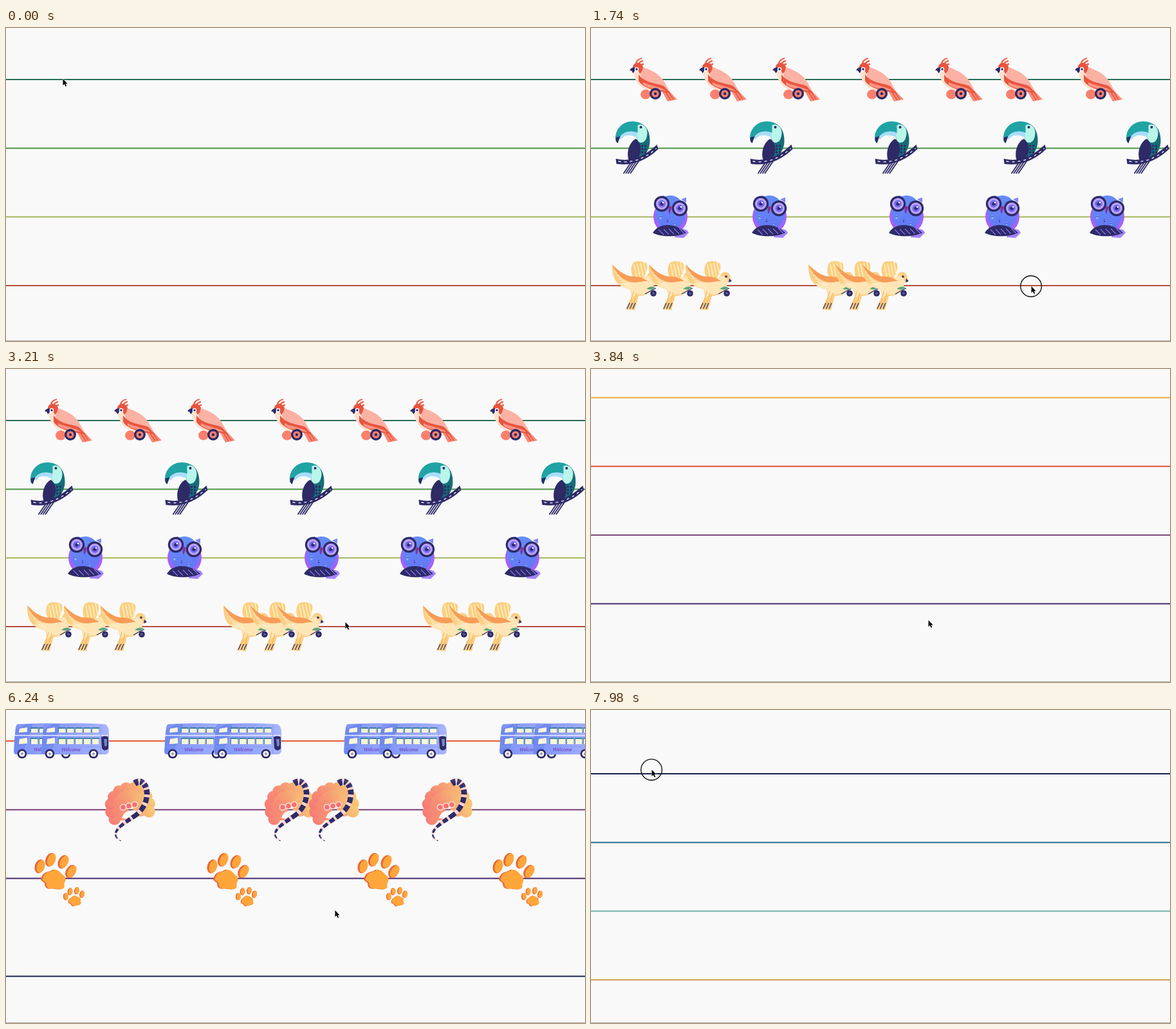
Animation of 900 by 486 pixels, one loop 8 s. Source, as an HTML page with a canvas:

```html
<!DOCTYPE html>
<html lang="en">
<head>
<meta charset="utf-8">
<title>Line garden</title>
<style>
html, body { margin: 0; width: 100%; height: 100%; overflow: hidden; background: #f9f9f9; }
canvas { display: block; width: 900px; height: 486px; }
</style>
</head>
<body>
<canvas id="stage"></canvas>
<script>
const LOOP = 8000, W = 900, H = 486, NAVY = '#2d2a66', CREAM = '#fde5b5';
const canvas = document.getElementById('stage');
const dpr = window.devicePixelRatio || 1;
canvas.width = W * dpr;
canvas.height = H * dpr;
const g = canvas.getContext('2d');

// drawing helpers
const paths = new Map();
function path(d) {
  if (!paths.has(d)) paths.set(d, new Path2D(d));
  return paths.get(d);
}
function fill(color, d) { g.fillStyle = color; g.fill(path(d)); }
function line(color, width, d) {
  g.strokeStyle = color;
  g.lineWidth = width;
  g.stroke(path(d));
}
function oval(color, x, y, rx, ry = rx, turn = 0) {
  g.fillStyle = color;
  g.beginPath();
  g.ellipse(x, y, rx, ry, turn, 0, 7);
  g.fill();
}
// concentric discs
function rings(x, y, r, step, ...shades) {
  shades.forEach((c, i) => oval(c, x, y, r - i * step));
}
// n parallel strokes, each shifted by (dx, dy)
function hatch(color, width, n, x, y, dx, dy, lx, ly) {
  g.strokeStyle = color;
  g.lineWidth = width;
  g.beginPath();
  for (let i = 0; i < n; i++) {
    g.moveTo(x + i * dx, y + i * dy);
    g.lineTo(x + i * dx + lx, y + i * dy + ly);
  }
  g.stroke();
}
function fade(x0, y0, x1, y1, a, b) {
  const c = g.createLinearGradient(x0, y0, x1, y1);
  c.addColorStop(0, a);
  c.addColorStop(1, b);
  return c;
}
function text(str, x, y, font, color) {
  g.font = font;
  g.fillStyle = color;
  g.fillText(str, x, y);
}
const mix = (a, b, u) => a + (b - a) * u;
const ease = u => u <= 0 ? 0 : u >= 1 ? 1 : u * u * (3 - 2 * u);

function paw() {
  const pad = 'M4 43C6 28 16 32 22 27C30 26 32 33 38 37C43 43 36 47 38 53C36 60 27 57 21 56C14 59 9 53 10 48Z';
  for (const [color, dx, thin] of [['#e8663a', -.5, 0], ['#ffa63a', 1.2, 1.5]]) {
    for (let i = 0; i < 4; i++) {
      const a = 3.75 + i * .76;
      oval(color, 24 + 27 * Math.cos(a) + dx, 36 + 25 * Math.sin(a), 7.5 - thin, 11 - thin / 2, .3 + i * .08);
    }
    g.save();
    g.translate(dx * 1.5, 0);
    fill(color, pad);
    g.restore();
  }
}

// each sprite: [half width, y of the line inside it, draw]
const sprites = {
  cardinal: [37, 34, () => {
    line('#f0604a', 2.3, 'M10 9Q11 3 19 1M14 10Q16 6 21 5M17 13Q18 10 22 10');
    fill('#fa8a78', 'M54 44L74 65L59 68L49 50Z');
    hatch('#e8553f', 1.5, 2, 53, 49, 4, -1, 11, 17);
    fill('#fde0cf', 'M6 23C8 38 18 51 40 54L58 52L20 18Z');
    fill('#fbb1a3', 'M18 14C31 18 46 24 54 38L62 52C40 50 24 44 17 27Z');
    fill('#e8553f', 'M14 26C24 40 40 39 53 44L64 56C46 51 24 51 14 36Z');
    fill('#fa9483', 'M21 38C30 43 42 44 53 49L57 52C42 49 28 48 21 42Z');
    fill('#e8553f', 'M5 15C6 6 17 6 21 14Q20 22 16 25Q12 16 5 15Z');
    fill(NAVY, 'M0 20Q2 15 8 15Q9 22 5 24Q3 19 0 20Z');
    rings(11, 18, 3.2, 1.4, '#fff', NAVY);
    oval('#fa806e', 25, 57, 8, 7.5);
    rings(40, 56, 9, 3.4, NAVY, '#fa806e', NAVY);
  }],
  toucan: [33.5, 42, () => {
    hatch(NAVY, 1.8, 4, 26, 62, 3.5, 0, -13, 19);
    fill('#176c78', 'M30 2C46 0 55 15 54 32C53 47 44 58 30 60C22 48 26 34 34 28Z');
    fill('#20a3a4', 'M1 31C-2 13 11 0 27 0Q39 0 42 6L36 19C24 12 9 16 4 33Z');
    fill('#a7ddfa', 'M6 26C13 14 27 14 36 18L34 25C24 20 15 20 9 28Z');
    fill(NAVY, 'M1 25L8 23L4 34Q1 32 1 25Z');
    fill('#b9f6e9', 'M35 6C43 2 49 8 50 17C50 28 45 34 39 33C33 31 33 24 35 18Z');
    oval(NAVY, 40, 9, 2);
    fill(NAVY, 'M32 27C42 34 42 50 34 58L22 62C17 52 20 34 32 27Z');
    for (let i = 0; i < 6; i++) oval(NAVY, 42 + i % 2 * 5, 38 + (i >> 1) * 5, 1.7);
    fill(NAVY, 'M1 58Q34 66 65 36L67 43Q38 71 2 66Z');
    g.setLineDash([4, 5]);
    line('#f4f4ff', 1.3, 'M5 62Q36 67 64 42');
    g.setLineDash([]);
  }],
  owl: [28, 34, () => {
    fill('#7f86f4', 'M12 5L16 1L24 4ZM44 7L52 4L52 12Z');
    oval('#a263f8', 27.5, 34, 26.5, 27);
    oval(fade(20, 5, 30, 62, '#668cfa', '#6273f2'), 27.5, 28, 23, 27);
    for (let i = 0; i < 9; i++) oval(i % 2 ? '#4436a0' : '#82b4ff', 12 + i * 11 % 33, 34 + i * 5 % 14, i % 3 ? 1.2 : 2);
    for (const [x, y] of [[14, 14], [42, 21]]) {
      rings(x, y, 12.2, 3.2, NAVY, '#bba4ff', '#7469ee', NAVY);
      oval('#fff', x + 2, y - 2, 1.3);
    }
    fill('#8a2f94', 'M26 17L30 19L26 30Q23 24 26 17Z');
    fill('#a284ff', 'M36 54Q52 50 56 59L48 67L34 66Z');
    fill(NAVY, 'M0 59C10 42 36 44 52 59C38 66 12 66 0 59Z');
    hatch('#8b72f4', 1.1, 5, 9, 54, 8, -.5, 8, 8);
  }],
  dove: [36, 38, () => {
    fill('#fbd07f', 'M32 25C27 14 30 3 35 1Q44 -2 53 3C57 10 52 21 46 30Z');
    hatch('#fff0cd', 1.4, 4, 34, 5, 5, -1, 4, 20);
    fill('#fbcf83', 'M0 5C-1 30 10 41 28 43L30 55L21 75L35 76L41 54C55 54 64 46 65 34L70 29C72 16 56 12 54 24C36 32 14 20 0 5Z');
    fill(CREAM, 'M10 35C24 34 48 28 57 23Q67 25 65 36C61 49 48 54 40 51L30 58L29 44Q18 43 10 35Z');
    hatch('#fff0cf', 1.2, 4, 4, 16, 3, 5, 20, 12);
    fill('#f79c58', 'M0 5C12 19 26 25 37 24Q47 25 55 31C44 31 32 36 22 30Q8 24 0 5Z');
    hatch('#f6b85d', 1.1, 2, 33, 47, 5, 2, -6, 22);
    hatch(NAVY, 1.2, 3, 23, 74, 4.5, 0, 4, -9);
    fill(NAVY, 'M68 27L72 31L67 33Z');
    oval(NAVY, 63, 24, 1.8);
    fill('#5aa57d', 'M53 43Q60 37 67 41Q62 46 53 43Z');
    line(NAVY, 1.2, 'M51 51L60 46L68 42');
    rings(64, 50, 4.8, 3, NAVY, '#675fa2');
  }],
  sign: [37.5, 39, () => {
    fill('#f7b9b7', 'M27 27C24 12 36 -1 48 0C58 4 56 20 45 30Z');
    fill('#f1655d', 'M12 39C5 25 7 12 14 10C28 15 31 27 26 36ZM47 38C48 24 57 18 64 22C64 31 59 40 50 43Z');
    fill('#f3746c', 'M12 73C-2 66 -3 47 6 41C17 42 22 60 18 73ZM18 65C17 51 24 44 31 47C36 53 30 65 24 71Z');
    line('#fff', 1.4, 'M7 45L15 70M27 50L21 66');
    hatch('#fff', 1.4, 3, 2, 51, 2, 7, 8, 2);
    hatch('#fff', 1.4, 3, 12, 47, 1, 7, -3, 6);
    for (let i = 0; i < 4; i++) {
      g.strokeStyle = NAVY;
      g.lineWidth = 1.4;
      g.beginPath();
      g.arc(20 + i * 9, 24, 3.5, 2.5, 7.5);
      g.stroke();
    }
    fill('#f27069', 'M15 28L53 30V45L15 43Z');
    line(NAVY, 2, 'M15 17V45M15 28L55 30M15 43L54 45M53 28V46');
    text('Welcome', 20, 39, 'italic 8px "Noto Serif", serif', '#fff');
    line('#f27069', 2, 'M42 57L54 45L65 57');
    fill(NAVY, 'M11 65Q12 59 19 62Q25 58 28 64Q28 73 19 75Q12 73 11 65Z');
    fill('#f26a65', 'M29 56H74Q76 66 74 79H30Q28 68 29 56Z');
    fill('#c43c4c', 'M30 72Q38 65 47 79H30Z');
    text('OPEN', 34, 72, 'bold 13px Lato, sans-serif', NAVY);
    rings(72, 57, 3.5, 2, '#e84945', NAVY);
  }],
  bus: [53, 27, () => {
    fill(fade(0, 0, 106, 0, '#7d92f6', '#aab5ff'), 'M6 1Q55 -2 99 1Q104 3 105 12V41Q105 47 100 48H4Q0 48 0 42L3 6Q4 2 6 1Z');
    fill('#7089ee', 'M3 10L18 1H29L24 18L14 47H1V25Z');
    hatch('#e9ecff', 1.6, 1, 2, 18.5, 0, 0, 102, 0);
    for (const [y, h] of [[6, 8], [22, 10]]) {
      for (let x = 26; x < 90; x += 13) {
        g.fillStyle = '#3a7fa8';
        g.fillRect(x, y, 12, h);
        g.fillStyle = '#f8f6d8';
        g.fillRect(x + 1, y + 2, 10.5, h - 2);
      }
      fill('#f8f6d8', `M9 ${y + 2}L21 ${y}V${y + h - 1}L8 ${y + h}Z`);
    }
    line('#8799f5', 1, 'M2 36H92M92 2V47');
    fill(NAVY, 'M93 21Q99 18 104 21V39Q98 45 94 38Z');
    fill('#7681c9', 'M97 24H102V34Q99 37 98 34Z');
    text('Welcome', 31, 43, 'italic 7px "Noto Serif", serif', '#6c2fb5');
    for (const x of [13, 81]) rings(x, 47, 7.3, 2.7, NAVY, '#fbf8f0', '#8d92bb');
  }],
  coral: [39.5, 49, () => {
    for (const [reach, r] of [[30, 9.5], [16, 11]]) {
      for (let a = 2.5; a < 6.7; a += .4) {
        const x = 39 + reach * Math.cos(a), y = 45 + reach * Math.sin(a);
        const warm = Math.round(mix(105, 185, x / 79));
        oval(fade(x - r, y + r, x + r, y - r, `rgb(246,${warm},115)`, `rgb(247,${warm + 35},118)`), x, y, r);
      }
    }
    fill('#f9f9f9', 'M26 62Q30 48 48 50L54 54L42 64Z');
    for (let i = 0; i < 3; i++) rings(28 + i * 9, 45 - i * 2, 5.3, 1.5, '#fde1d8', '#f5716e');
    tail();
  }],
  paws: [36.5, 41, () => {
    paw();
    g.translate(57, 69);
    g.rotate(-.3);
    g.scale(.52, .52);
    g.translate(-29, -31);
    paw();
  }]
};

// striped tail that thins toward its tip
function tail() {
  const bez = (a, b, c, d, u) => mix(mix(mix(a, b, u), mix(b, c, u), u), mix(mix(b, c, u), mix(c, d, u), u), u);
  const at = u => u < .6
    ? [bez(46, 66, 78, 42, u / .6), bez(8, -7, 41, 61, u / .6)]
    : [bez(42, 30, 3, 24, u / .4 - 1.5), bez(61, 70, 85, 97, u / .4 - 1.5)];
  for (let i = 0; i < 100; i++) {
    const [x, y] = at(i / 100), [x2, y2] = at((i + 1.4) / 100);
    g.strokeStyle = i % 9 < 6 ? NAVY : '#fbd0cb';
    g.lineWidth = i < 60 ? 10 - i / 20 : mix(7, 1, (i - 60) / 40);
    g.beginPath();
    g.moveTo(x, y);
    g.lineTo(x2, y2);
    g.stroke();
  }
}

// page: three groups of four lines
const colors = ['#2a6e58', '#4f9448', '#a5b85c', '#b5503f', '#f6ae38', '#e4552f',
  '#7a4378', '#49296b', '#1a2350', '#28708f', '#74b3ac', '#d3a14d'];
const lineY = colors.map((c, i) => 80 + (i >> 2) * 472 + i % 4 * 320 / 3);

// scroll moves: start, duration, distance
const moves = [[3240, 210, 403.5], [3690, 150, 104], [4100, 300, -21],
  [5790, 140, 124], [6570, 300, 304.5], [7020, 60, 10]];
const scrollAt = t => moves.reduce((sum, [from, span, by]) => sum + by * ease((t - from) / span), 0);

// resting points of the pointer; planting adds the rest
const stops = [[0, 88, 79], [1740, 684, 401], [2600, 640, 453], [3210, 527, 393], [3840, 524, 390],
  [4020, 524, 390], [4830, 101, 66], [5220, 283, 69], [6240, 511, 311], [7260, 511, 311], [7980, 94, 92.7]];
const items = [], clicks = [LOOP];

function plant(kind, row, start, gap, xs) {
  xs.forEach((x, i) => {
    const t = start + i * gap;
    items.push({ kind, row, x, t });
    clicks.push(t);
    stops.push([t, x, lineY[row] - scrollAt(t)]);
  });
}
plant('cardinal', 0, 75, 47, [97, 205, 319, 449, 572, 665, 789]);
plant('toucan', 1, 430, 67, [865, 674, 474, 280, 71]);
plant('owl', 2, 770, 72, [124, 278, 491, 640, 803]);
[[69, 57], [374, 42], [684, 41]].forEach(([x, d], i) => plant('dove', 3, 1200 + i * 290, 85, [x, x + d, x + 2 * d]));
plant('sign', 4, 4990, 0, [101]);
plant('sign', 4, 5290, 53, [290, 480, 670, 850]);
[[65, 43], [299, 77], [578, 55], [820, 52]].forEach(([x, d], i) => plant('bus', 5, 5510 + i * 66, 33, [x, x + d]));
plant('coral', 6, 5940, 30, [193.5, 441.5, 510.5, 686.5]);
plant('paws', 7, 6080, 30, [87.5, 355.5, 589.5, 799.5]);
stops.sort((a, b) => a[0] - b[0]);

function pointerAt(t) {
  const i = stops.findIndex(s => s[0] > t);
  if (i < 0) return stops[stops.length - 1].slice(1);
  const [t0, x0, y0] = stops[i - 1], [t1, x1, y1] = stops[i];
  const u = ease((t - t0) / (t1 - t0));
  return [mix(x0, x1, u), mix(y0, y1, u)];
}

function drawPointer(t) {
  g.save();
  g.translate(...pointerAt(t));
  if (clicks.some(c => Math.abs(t - c) < 55)) {
    g.strokeStyle = '#111';
    g.lineWidth = 1.4;
    g.beginPath();
    g.arc(0, 0, 16.3, 0, 7);
    g.stroke();
  }
  const arrow = 'M0.5 0V10.2L2.8 8L4.5 11.8L6.2 11L4.5 7.4H7.5Z';
  line('#fff', 1, arrow);
  fill('#000', arrow);
  g.restore();
}

function draw(t) {
  const scroll = scrollAt(t);
  g.setTransform(dpr, 0, 0, dpr, 0, 0);
  g.fillStyle = '#f9f9f9';
  g.fillRect(0, 0, W, H);
  lineY.forEach((y, i) => {
    g.fillStyle = colors[i];
    g.fillRect(0, y - scroll - 1, W, 2);
  });
  for (const { kind, row, x, t: born } of items) {
    const y = lineY[row] - scroll;
    if (t < born || y < 0 || y > H) continue;
    const [half, base, paint] = sprites[kind];
    g.save();
    g.translate(x - half, Math.round(y) - base);
    paint();
    g.restore();
  }
  g.fillStyle = '#a8a8a8';
  g.fillRect(0, H - 1, W, 1);
  drawPointer(t);
}

const start = performance.now();
function tick() {
  draw((performance.now() - start) % LOOP);
  requestAnimationFrame(tick);
}
tick();
</script>
</body>
</html>
```
